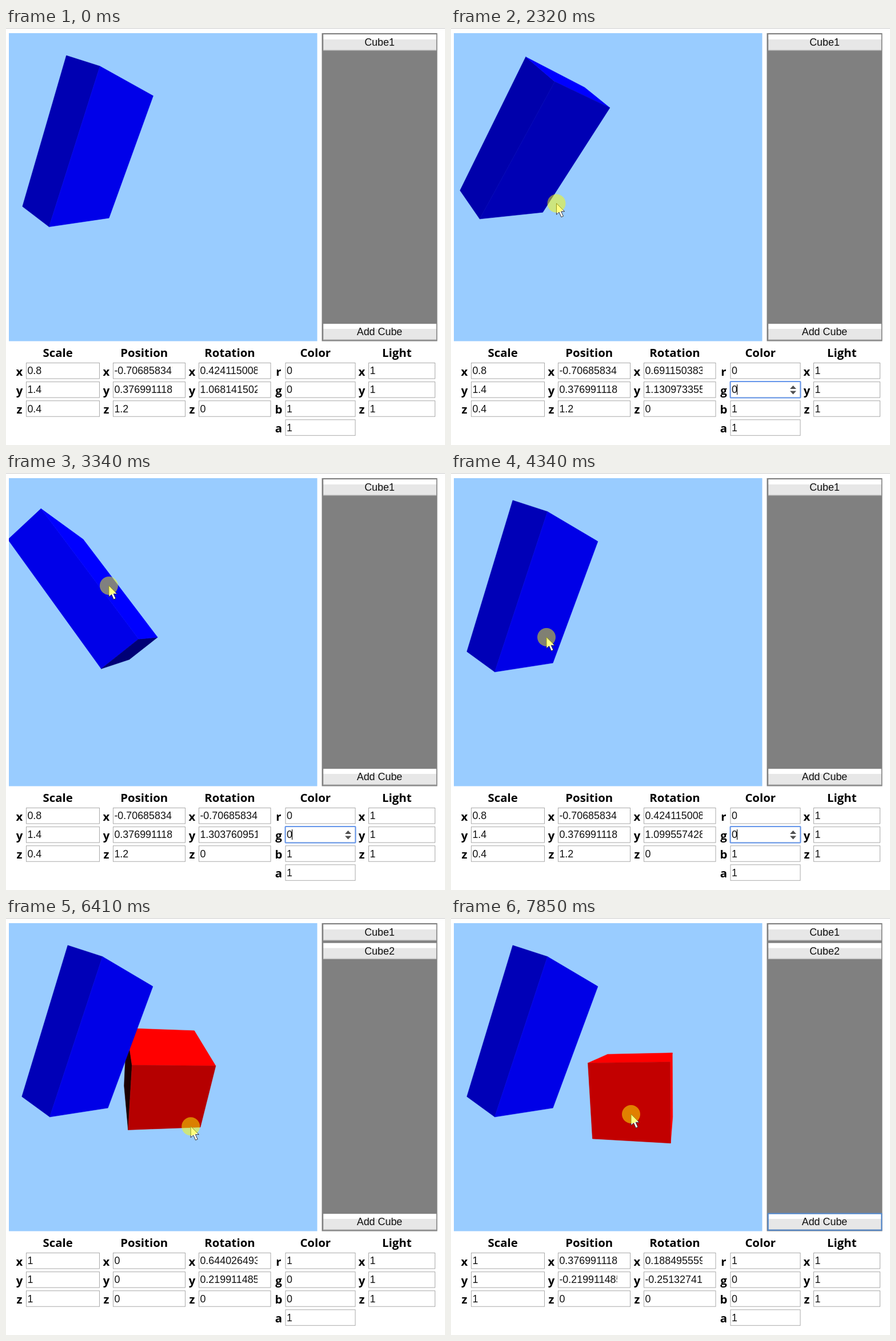
An HTML page that plays this animation: 768 by 729 pixels, repeating every 8 s.

```html
<!DOCTYPE html>
<html lang="en">
<head>
<meta charset="utf-8">
<title>Cube editor</title>
<style>
  html, body { margin: 0; width: 100%; height: 100%; overflow: hidden; background: #fff; }
  #stage { display: block; width: 768px; height: 729px; }
  text { font: 17.9px "Liberation Sans", Arial, sans-serif; fill: #111; white-space: pre; }
  .label { font: bold 20.4px "Open Sans", "Noto Sans", sans-serif; fill: #000; }
  .label, .caption { text-anchor: middle; }
</style>
</head>
<body>
<svg id="stage" viewBox="0 0 768 729"></svg>
<script>
const LOOP = 8000;
const UNIT = Math.PI / 200;   // one step of rotation or position
const GAIN = .8;              // steps per dragged pixel
const FIELD_DELAY = 60;       // number fields trail the pointer
const VIEW_DELAY = 95;        // the 3D view trails a little more
const FOCAL = 491, EYE = 3.94, CENTER = [270, 269.5];
const APPEAR = 210, GRAB = 1630, PRESS = 4920, CREATE = 5080, REFOCUS = 7850;

// Pointer path, time and place. Every cube motion follows from it.
const PATH = [
  [210, 586, 678], [1060, 164.5, 287], [1560, 164.5, 287],
  [1790, 128.2, 295.8], [2000, 106, 314], [2320, 184.3, 306.7],
  [2840, 284, 246], [3280, 183.2, 197], [3380, 178, 197],
  [3980, 167, 287], [4360, 167, 287], [4830, 634, 532], [5450, 634, 532],
  [5950, 303, 305], [6440, 324.5, 368], [7330, 283, 320],
  [7480, 285, 325.5], [7730, 315, 343]
];
const BLUE_TURN = [1560, 3980], RED_TURN = [5950, 7330], RED_MOVE = [7480, 7730];

const clamp = (v, low, high) => Math.min(high, Math.max(low, v));

function pointerAt(t) {
  const next = clamp(PATH.findIndex(key => key[0] > t), -1, PATH.length);
  if (next <= 0) return PATH.at(next === 0 ? 0 : -1).slice(1);
  const [t0, x0, y0] = PATH[next - 1], [t1, x1, y1] = PATH[next];
  const k = (t - t0) / (t1 - t0);
  return [x0 + (x1 - x0) * k, y0 + (y1 - y0) * k];
}

// Steps dragged so far between the grab and the release.
function dragged(t, [grab, release]) {
  const from = pointerAt(grab), to = pointerAt(clamp(t, grab, release));
  return to.map((v, i) => (v - from[i]) * GAIN);
}
function blueTurn(t) {
  const [dx, dy] = dragged(t, BLUE_TURN);
  return [27 + dy, 68 + dx, 0];
}
function redTurn(t) {
  const [dx, dy] = dragged(t, RED_TURN);
  return [dy, dx, 0];
}
function redMove(t) {
  const [dx, dy] = dragged(t, RED_MOVE);
  return [dx, -dy, 0];
}
const scaled = steps => steps.map(s => s * UNIT);
const rounded = steps => scaled(steps.map(Math.round));

// ---- layout ----
function add(parent, tag, attrs = {}, content) {
  const node = document.createElementNS("http://www.w3.org/2000/svg", tag);
  for (const name in attrs) node.setAttribute(name, attrs[name]);
  if (content !== undefined) node.textContent = content;
  return parent.appendChild(node);
}
const rect = (parent, x, y, width, height, fill, more = {}) =>
  add(parent, "rect", { x, y, width, height, fill, ...more });
const show = (node, on) => node.setAttribute("visibility", on ? "visible" : "hidden");

const stage = document.getElementById("stage");
rect(stage, 0, 0, 768, 1, "#cacaca");
const view = add(stage, "svg", { x: 5, y: 9, width: 539.5, height: 538.5 });
rect(view, 0, 0, 540, 539, "#99ccff");
rect(stage, 552.5, 9, 202, 538.5, "#808080");

function button(y, caption) {
  const group = add(stage, "g");
  rect(group, 555, y, 198, 28.5, "#c4c4c4");
  rect(group, 555.5, y + .5, 197, 26.5, "#e7e7e7");
  rect(group, 555.5, y + .5, 197, 8.5, "#fff");
  add(group, "text", { x: 653.5, y: y + 20.4, class: "caption" }, caption);
  return group;
}
button(11, "Cube1");
const secondButton = button(43.5, "Cube2");
const addButton = button(517, "Add Cube");
const pressed = rect(addButton, 555, 517, 198, 28.5, "#000", { "fill-opacity": .1 });
const addRing = rect(addButton, 554.7, 516.7, 198.6, 29, "none",
  { stroke: "#5088cf", "stroke-width": 2 });

function column(title, left, right, labels) {
  add(stage, "text", { x: (left - 17.5 + right) / 2, y: 574.5, class: "label" }, title);
  return [...labels].map((label, row) => {
    const top = 585 + row * 33.1, width = right - left;
    add(stage, "text", { x: left - 11.5, y: top + 22.5, class: "label" }, label);
    rect(stage, left + .5, top + .5, width - 1, 27.5, "#fff", { stroke: "#a9a9a9" });
    const inner = add(stage, "svg", { x: left + 1, y: top, width: width - 24.5, height: 29 });
    const text = add(inner, "text", { x: 1.4, y: 20.4 });
    const spin = add(stage, "path", { fill: "#505050",
      d: `M${right - 18.5} ${top + 13}l5.5-6 5.5 6zm0 3.5h11l-5.5 6z` });
    return { left, right, top, text, spin };
  });
}
const fields = [
  column("Scale", 35, 164, "xyz"),
  column("Position", 187, 314, "xyz"),
  column("Rotation", 337, 463.5, "xyz"),
  column("Color", 488.5, 611.5, "rgba"),
  column("Light", 634, 751, "xyz")
];

const focus = add(stage, "g");
const green = fields[3][1];
rect(focus, green.left, green.top, green.right - green.left, 28.5, "none",
  { stroke: "#6797ec", "stroke-width": 2, rx: 1 });
rect(focus, 500, green.top + 5, 1.2, 18, "#111");

const pointer = add(stage, "g");
add(pointer, "path", { d: "M0 0V19.5L4.6 15.4 8.4 24 12 22.4 8.2 14.2H14.2Z",
  fill: "#fff", stroke: "#333" });
add(pointer, "circle", { r: 16, fill: "#ff0", "fill-opacity": .5 });

// ---- cubes ----
function rotate([x, y, z], [rx, ry]) {
  const y1 = y * Math.cos(rx) - z * Math.sin(rx);
  const z1 = y * Math.sin(rx) + z * Math.cos(rx);
  return [x * Math.cos(ry) + z1 * Math.sin(ry), y1, z1 * Math.cos(ry) - x * Math.sin(ry)];
}

function project([x, y, z]) {
  const zoom = FOCAL / (EYE - z);
  return [CENTER[0] + x * zoom, CENTER[1] - y * zoom];
}

function makeCube(scale, color) {
  const group = add(view, "g");
  const faces = [0, 1, 2].flatMap(axis => [-1, 1].map(side =>
    ({ axis, side, node: add(group, "polygon", { "stroke-width": .6 }) })));

  function draw(position, angles) {
    for (const { axis, side, node } of faces) {
      const toAxes = (a, b, c) => {
        const v = [];
        [a, b, c].forEach((value, i) => v[(axis + i) % 3] = value);
        return v;
      };
      const points = [[-1, -1], [1, -1], [1, 1], [-1, 1]].map(([u, v]) => {
        const corner = toAxes(side, u, v).map((c, i) => c * scale[i] / 2);
        return project(rotate(corner, angles).map((c, i) => c + position[i]));
      });
      const area = points.reduce((sum, [x, y], i) => {
        const [nx, ny] = points[(i + 1) % 4];
        return sum + x * ny - nx * y;
      }, 0);
      const [nx, ny, nz] = rotate(toAxes(side, 0, 0), angles);
      const light = 255 * clamp(.5 + .5 * (nx + ny + nz), 0, 1);
      const fill = `rgb(${color.slice(0, 3).map(c => Math.round(c * light))})`;
      node.setAttribute("display", area * side < 0 ? "inline" : "none");
      node.setAttribute("points", points.map(p => p.map(c => c.toFixed(2))).join(" "));
      node.setAttribute("fill", fill);
      node.setAttribute("stroke", fill);
    }
  }
  return { group, scale, color, draw };
}
const red = makeCube([1, 1, 1], [1, 0, 0, 1]);
const blue = makeCube([.8, 1.4, .4], [0, 0, 1, 1]);
const bluePlace = [...scaled([-45, 24]), 1.2];

function draw(t) {
  const second = t >= CREATE;
  const focused = t >= GRAB && t < PRESS;
  const seen = t - VIEW_DELAY, typed = t - FIELD_DELAY;
  const [px, py] = pointerAt(t);

  blue.draw(bluePlace, scaled(blueTurn(seen)));
  red.draw(scaled(redMove(seen)), scaled(redTurn(seen)));
  show(red.group, second);

  const cube = second ? red : blue;
  const values = [
    cube.scale,
    second ? rounded(redMove(typed)) : bluePlace,
    rounded(second ? redTurn(typed) : blueTurn(typed)),
    cube.color,
    [1, 1, 1]
  ];
  fields.forEach((rows, c) => rows.forEach((field, r) => {
    field.text.textContent = String(values[c][r]);
    const hovered = t >= APPEAR && px > field.left && px < field.right &&
      py > field.top && py < field.top + 28;
    show(field.spin, hovered || (focused && field === green));
  }));

  show(focus, focused);
  show(secondButton, second);
  show(pressed, t >= PRESS && t < CREATE);
  show(addRing, t >= REFOCUS);
  show(pointer, t >= APPEAR);
  pointer.setAttribute("transform", `translate(${px.toFixed(1)} ${py.toFixed(1)})`);
}

const start = performance.now();
function tick() {
  draw((performance.now() - start) % LOOP);
  requestAnimationFrame(tick);
}
tick();
</script>
</body>
</html>
```
